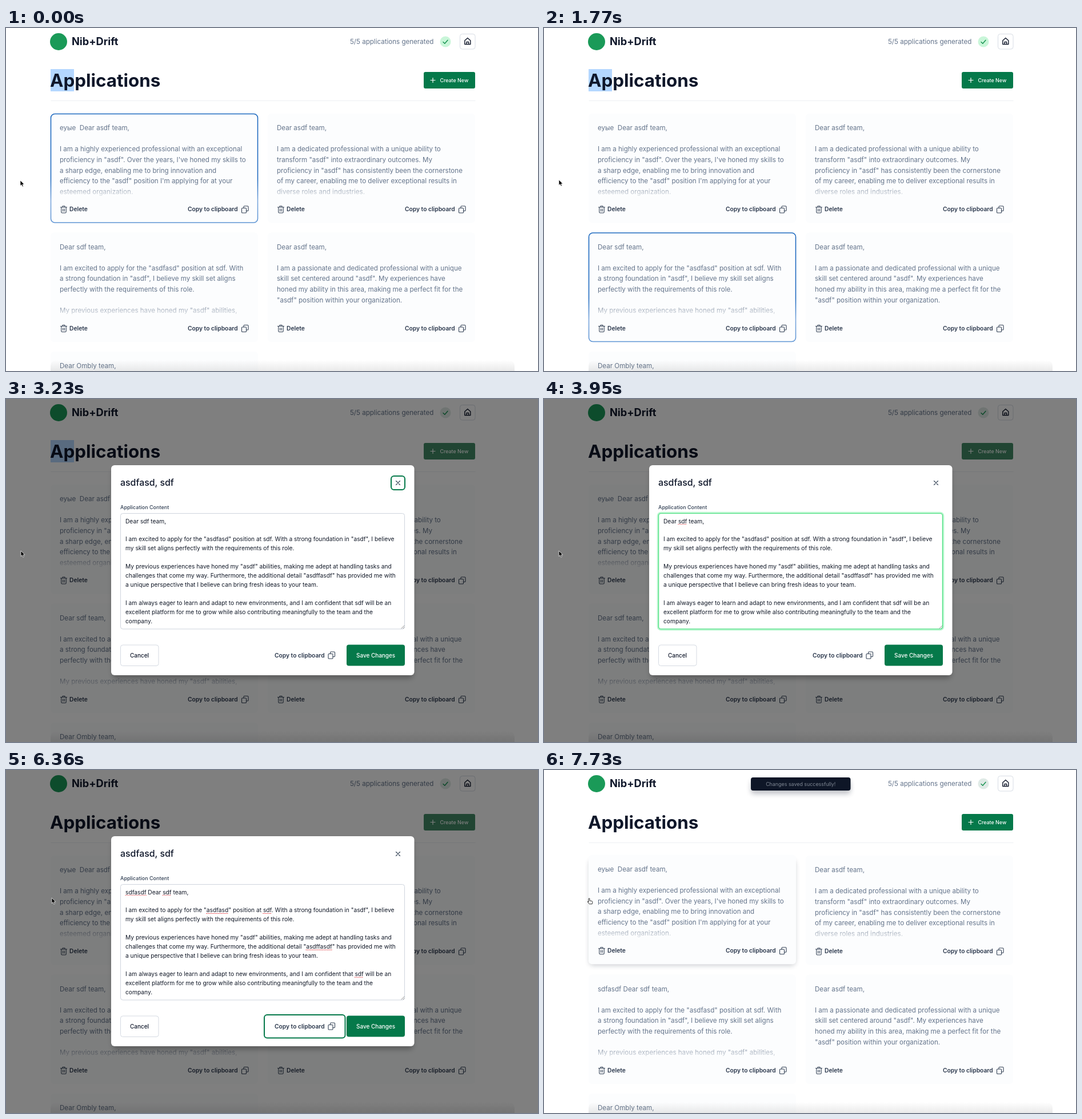
An HTML page that plays this animation: 931x601 px, repeating every 8 s.

```html
<!DOCTYPE html>
<html lang="en">
<head>
<meta charset="utf-8">
<title>Applications</title>
<style>
  html, body { margin: 0; width: 100%; height: 100%; overflow: hidden; background: #fff; }
  svg { display: block; width: 100%; height: 100%; }
  text { font-family: Inter, "Noto Sans", sans-serif; white-space: pre; }
  .body { font-size: 11.58px; fill: #64748b; }
  .action { font-size: 10.25px; font-weight: 600; fill: #28354a; }
  .area { font-size: 10.23px; fill: #111827; }
  .label { font-size: 9px; font-weight: 500; }
  .button { font-size: 9.95px; font-weight: 500; }
</style>
</head>
<body>
<svg id="stage" viewBox="0 0 931 601" xmlns="http://www.w3.org/2000/svg">
  <defs>
    <linearGradient id="ring" x1="0" y1="0" x2="0" y2="1">
      <stop offset=".6" stop-color="#1d69bf"/><stop offset=".8" stop-color="#7aa6dc"/><stop offset="1" stop-color="#5f95d4"/>
    </linearGradient>
    <linearGradient id="veil" x1="0" y1="0" x2="0" y2="1">
      <stop offset="0" stop-color="#fcfdfe" stop-opacity="0"/><stop offset="1" stop-color="#fcfdfe"/>
    </linearGradient>
    <linearGradient id="floor" x1="0" y1="0" x2="0" y2="1">
      <stop offset="0" stop-color="#555" stop-opacity="0"/><stop offset="1" stop-color="#555" stop-opacity=".2"/>
    </linearGradient>
    <filter id="soft" x="-20%" y="-60%" width="140%" height="260%"><feGaussianBlur stdDeviation="4"/></filter>
  </defs>
</svg>
<script>
const LOOP = 8000;
const GREEN = '#05794a', INK = '#0f172a', SLATE = '#334155';
const svg = document.getElementById('stage');

function add(parent, tag, attrs = {}, content) {
  const node = document.createElementNS(svg.namespaceURI, tag);
  for (const key in attrs) node.setAttribute(key, attrs[key]);
  if (content !== undefined) node.textContent = content;
  parent.appendChild(node);
  return node;
}
const set = (node, key, value) => node.setAttribute(key, value);
const group = (parent, attrs) => add(parent, 'g', attrs);
const label = (parent, x, y, content, attrs) => add(parent, 'text', { x, y, ...attrs }, content);
const line = (parent, d, stroke, width = 1.2, attrs) => add(parent, 'path', {
  d, stroke, 'stroke-width': width, fill: 'none', 'stroke-linecap': 'round', 'stroke-linejoin': 'round', ...attrs });
// Box given by its edges
const box = (parent, x1, y1, x2, y2, rx, attrs) => add(parent, 'rect', {
  x: x1, y: y1, width: x2 - x1, height: y2 - y1, rx, ...attrs });
const ramp = (t, from, span) => Math.min(1, Math.max(0, (t - from) / span));
const easeOut = p => 1 - (1 - p) ** 3;

// Focus rings: each fades in at its start and is cut at its end
const rings = [];
function ring(parent, [x1, y1, x2, y2], from, to, attrs = {}, fade = 120) {
  const node = box(parent, x1, y1, x2, y2, 5, { fill: 'none', stroke: GREEN, 'stroke-width': 2, ...attrs });
  rings.push({ node, from, to, fade });
}

function copyIcon(parent, x, y) {
  box(parent, x, y + 3.5, x + 8, y + 12, 1.3, { fill: 'none', stroke: SLATE, 'stroke-width': 1.1 });
  line(parent, `M${x + 3.5} ${y + 3.3}v-2q0-1.300 1.300-1.300h5.400q1.300 0 1.300 1.300v5.900q0 1.300-1.300 1.300h-2`, SLATE, 1.1);
}
function trashIcon(parent, x, y) {
  line(parent, `M${x} ${y + 2.5}h11m-7.500 0v-2h4v2M${x + 1.3} ${y + 2.5}v8.500q0 1.500 1.500 1.500h5.400q1.500 0 1.500-1.500v-8.500m-5.500 3v4m2.600-4v4`, SLATE, 1.1);
}

// Header
const page = group(svg);
add(page, 'circle', { cx: 92, cy: 24, r: 15, fill: '#1a9a58' });
label(page, 115, 30, 'Nib+Drift', { 'font-size': 18.2, 'font-weight': 700, fill: INK });
label(page, 602, 28, '5/5 applications generated', { class: 'body' });
const badge = add(page, 'circle', { cx: 769, cy: 24, r: 9.5 });
line(page, 'M765 24.500l2.800 2.800l5.200-6', '#15924f', 1.4);
box(page, 794.5, 10.5, 821, 37, 4, { fill: '#fff', stroke: '#d8dde5' });
line(page, 'M802.800 22l5-4.500l5 4.500v6.500h-10zM806 28.500v-4h3.600v4', INK, 1.4);

// Title row
const selection = box(page, 78, 72, 119, 111, 0, { fill: '#b4d7ff' });
label(page, 77, 103, 'Applications', { 'font-size': 31.4, 'font-weight': 700, fill: INK });
const create = box(page, 731, 77, 821, 106, 3);
line(page, 'M743 91.500h8M747 87.500v8', '#fff', 1.2);
label(page, 759.5, 95, 'Create New', { 'font-size': 8.9, 'font-weight': 500, fill: '#fff' });
line(page, 'M79 127.500H821', '#edf0f3', 1);

// Cards
function card(x, y, lines) {
  const g = group(page);
  const shadow = box(g, x + 1, y + 8, x + 362, y + 194, 8, { fill: '#0f172a', opacity: 0, filter: 'url(#soft)' });
  box(g, x, y, x + 363, y + 191.5, 6, { fill: '#fcfdfe' });
  const texts = lines.map((content, i) => label(g, x + 16, y + 29 + 18.64 * i, content, { class: 'body' }));
  box(g, x + 8, y + 122, x + 355, y + 150, 0, { fill: 'url(#veil)' });
  trashIcon(g, x + 17.5, y + 161.5);
  label(g, x + 33, y + 171.4, 'Delete', { class: 'action' });
  label(g, x + 240, y + 171.4, 'Copy to clipboard', { class: 'action' });
  copyIcon(g, x + 334.5, y + 162);
  return { g, shadow, texts };
}
const LEFT = 78, RIGHT = 458, ROW1 = 150, ROW2 = 358.5;
const first = card(LEFT, ROW1, ['еуые\u00a0 Dear asdf team,', '',
  'I am a highly experienced professional with an exceptional',
  'proficiency in "asdf". Over the years, I\'ve honed my skills to',
  'a sharp edge, enabling me to bring innovation and',
  'efficiency to the "asdf" position I\'m applying for at your',
  'esteemed organization.']);
card(RIGHT, ROW1, ['Dear asdf team,', '',
  'I am a dedicated professional with a unique ability to',
  'transform "asdf" into extraordinary outcomes. My',
  'proficiency in "asdf" has consistently been the cornerstone',
  'of my career, enabling me to deliver exceptional results in',
  'diverse roles and industries.']);
const edited = card(LEFT, ROW2, ['Dear sdf team,', '',
  'I am excited to apply for the "asdfasd" position at sdf. With',
  'a strong foundation in "asdf", I believe my skill set aligns',
  'perfectly with the requirements of this role.', '',
  'My previous experiences have honed my "asdf" abilities,']);
card(RIGHT, ROW2, ['Dear asdf team,', '',
  'I am a passionate and dedicated professional with a unique',
  'skill set centered around "asdf". My experiences have',
  'honed my ability in this area, making me a perfect fit for the',
  '"asdf" position within your organization.']);
card(LEFT, 567, ['Dear Ombly team,']);
box(page, 78, 582, 890, 612, 10, { fill: 'url(#floor)' });

const cardRing = (x, y, from, to) => ring(page, [x + .5, y + .5, x + 362.5, y + 191], from, to,
  { stroke: 'url(#ring)', 'stroke-width': 1.6, rx: 7 }, 40);
const deleteRing = (x, from, to) => ring(page, [x + 2, 298, x + 81, 337], from, to);
const copyRing = (x, from, to) => ring(page, [x + 225, 298, x + 361, 337], from, to);
cardRing(LEFT, ROW1, -100, 500);
deleteRing(LEFT, 500, 680);
copyRing(LEFT, 680, 830);
cardRing(RIGHT, ROW1, 830, 1230);
deleteRing(RIGHT, 1230, 1440);
copyRing(RIGHT, 1440, 1730);
cardRing(LEFT, ROW2, 1730, 2590);

// Dialog
const dialog = group(svg);
box(dialog, 0, 0, 931, 601, 0, { fill: '#000', opacity: .5 });
box(dialog, 186, 122, 713, 490, 8, { fill: '#000', opacity: .25, filter: 'url(#soft)' });
box(dialog, 184, 116, 714.5, 484, 6, { fill: '#fff' });
label(dialog, 200, 152, 'asdfasd, sdf', { 'font-size': 15.9, 'font-weight': 500, fill: INK });
line(dialog, 'M682.500 143.500l7 7M689.500 143.500l-7 7', SLATE, 1.1);
label(dialog, 200, 193, 'Application Content', { class: 'label', fill: SLATE });
box(dialog, 200.5, 200.5, 697.5, 403, 4, { fill: '#fff', stroke: '#cfd5de' });
line(dialog, 'M692 402l5-5M695 402l2-2', '#777', .8);
const area = [
  [0, 'Dear sdf team,'],
  [2, 'I am excited to apply for the "asdfasd" position at sdf. With a strong foundation in "asdf", I believe'],
  [3, 'my skill set aligns perfectly with the requirements of this role.'],
  [5, 'My previous experiences have honed my "asdf" abilities, making me adept at handling tasks and'],
  [6, 'challenges that come my way. Furthermore, the additional detail "asdffasdf" has provided me with'],
  [7, 'a unique perspective that I believe can bring fresh ideas to your team.'],
  [9, 'I am always eager to learn and adapt to new environments, and I am confident that sdf will be an'],
  [10, 'excellent platform for me to grow while also contributing meaningfully to the team and the'],
  [11, 'company.']
].map(([row, content]) => label(dialog, 209, 217.5 + 15.95 * row, content, { class: 'area' }));

box(dialog, 200.5, 431, 267, 467.5, 4, { fill: '#fff', stroke: '#d5dae2' });
label(dialog, 217, 452.7, 'Cancel', { class: 'button', fill: INK });
label(dialog, 470, 452.7, 'Copy to clipboard', { class: 'action' });
copyIcon(dialog, 564, 443);
const save = box(dialog, 596, 430.5, 698, 467.5, 4);
label(dialog, 613, 452.7, 'Save Changes', { class: 'button', fill: '#fff' });

ring(dialog, [183.7, 115.7, 714.8, 484.3], 2580, 3090, { stroke: '#3379cc', 'stroke-width': 1.5, rx: 7 }, 1);
ring(dialog, [674, 135, 698, 159], 3090, 3640);
ring(dialog, [199.5, 199.5, 698.5, 404], 3640, 4860, { stroke: '#bbf7d0', 'stroke-width': 3.5 });
ring(dialog, [200.5, 200.5, 697.5, 403], 3640, 4860, { stroke: '#4ade80', 'stroke-width': 1.2, rx: 4 });
ring(dialog, [198.5, 429, 269, 469.5], 4860, 5320);
ring(dialog, [452, 429, 593.5, 469.5], 5320, 6910);
ring(dialog, [595.2, 429.7, 698.8, 468.3], 6910, LOOP, { stroke: '#fff', 'stroke-width': 1.6 });
ring(dialog, [594.5, 428.8, 699.7, 469.2], 6910, LOOP, { stroke: '#087a48' });

// Spelling marks: the word, its line in the text and the time it is flagged
const marks = [
  ['sdfasdf', 0, 4650], ['sdf', 0, 3800], ['asdfasd', 1, 5500],
  ['sdf', 1, 5500], ['asdffasdf', 4, 5500], ['sdf', 6, 5500]
].map(([word, row, from]) => ({ word: new RegExp(`\\b${word}\\b`), size: word.length, row, from,
  node: line(dialog, '', '#e5484d', 1.2, { 'stroke-dasharray': '.6 2' }) }));

function placeMark({ word, size, row, from, node }, t) {
  const text = area[row], at = text.textContent.search(word);
  const shown = t >= from && at >= 0;
  set(node, 'opacity', shown ? 1 : 0);
  if (!shown) return;
  const x1 = text.getStartPositionOfChar(at).x;
  const x2 = text.getEndPositionOfChar(at + size - 1).x;
  set(node, 'd', `M${x1} ${+text.getAttribute('y') + 2}H${x2}`);
}

// Toasts
function toast(x1, x2, content, fill, ink) {
  const g = group(svg);
  box(g, x1, 19, x2, 42, 5, { fill: '#0f172a', opacity: .25, filter: 'url(#soft)' });
  box(g, x1, 13, x2, 36, 4, { fill });
  label(g, (x1 + x2) / 2, 28, content, { 'font-size': 8.9, fill: ink, 'text-anchor': 'middle' });
  return g;
}
const copied = toast(380, 518, 'Copied to clipboard', '#1a2744', '#a8b1c0');
const saved = toast(362, 536.5, 'Changes saved successfully!', '#0e1627', '#818995');
function showToast(node, enter, leave) {
  set(node, 'transform', `translate(0 ${-11 * (1 - enter)})`);
  set(node, 'opacity', enter * (1 - leave));
}

// Pointers
const arrow = add(svg, 'path', { d: 'M0 0v9.600l2.200-2l1.500 3.500l1.700-.7l-1.500-3.400h3z',
  fill: '#000', stroke: '#fff', 'stroke-width': .7 });
const hand = line(svg, 'M-2 1v-5q0-1.200 1-1.200t1 1.200v3l4 .8q1 .3.900 1.500l-.7 3.500h-5l-2.700-3.500q-.6-1.200.5-1.300z',
  '#222', .9, { fill: '#fff', transform: 'translate(80 230)' });

function movePointer(t) {
  const p = easeOut(ramp(t, 5400, 440));
  const x = t < 50 ? 25 : t < 5320 ? 26 : 40 + 40 * p;
  const y = t < 50 ? 267 : t < 5320 ? 266 : 250 - 26 * p;
  const hidden = t >= 4270 && t < 5400;
  set(arrow, 'transform', `translate(${x} ${y})`);
  set(arrow, 'opacity', hidden || t >= 7450 ? 0 : 1);
  set(hand, 'opacity', t >= 7450 ? 1 : 0);
}

function draw(t) {
  const opened = t >= 2580;
  const closing = ramp(t, 7540, 150);
  const dimmed = opened && closing < .5;

  set(selection, 'opacity', t < 3640 ? 1 : 0);
  set(badge, 'fill', opened ? '#dfeae6' : '#c9f6d9');
  set(create, 'fill', dimmed ? '#438b67' : GREEN);
  set(dialog, 'opacity', opened ? 1 - closing : 0);
  set(save, 'fill', t >= 7450 ? '#05613a' : GREEN);

  for (const { node, from, to, fade } of rings)
    set(node, 'opacity', t < to ? ramp(t, from, fade) : 0);

  const typed = t < 4280 ? 0 : Math.min(8, Math.floor((t - 4280) / 46) + 1);
  const greeting = 'sdfasdf '.slice(0, typed) + 'Dear sdf team,';
  if (area[0].textContent !== greeting) area[0].textContent = greeting;
  edited.texts[0].textContent = t >= 7540 ? 'sdfasdf Dear sdf team,' : 'Dear sdf team,';
  for (const mark of marks) placeMark(mark, t);

  const hover = ramp(t, 7560, 150);
  set(first.g, 'transform', `translate(0 ${-1.2 * hover})`);
  set(first.shadow, 'opacity', .2 * hover);

  showToast(copied, easeOut(ramp(t, 6400, 320)), ramp(t, 7540, 80));
  showToast(saved, easeOut(ramp(t, 7540, 180)), 0);
  movePointer(t);
}

const start = performance.now();
function tick() {
  draw((performance.now() - start) % LOOP);
  requestAnimationFrame(tick);
}
tick();
</script>
</body>
</html>
```
